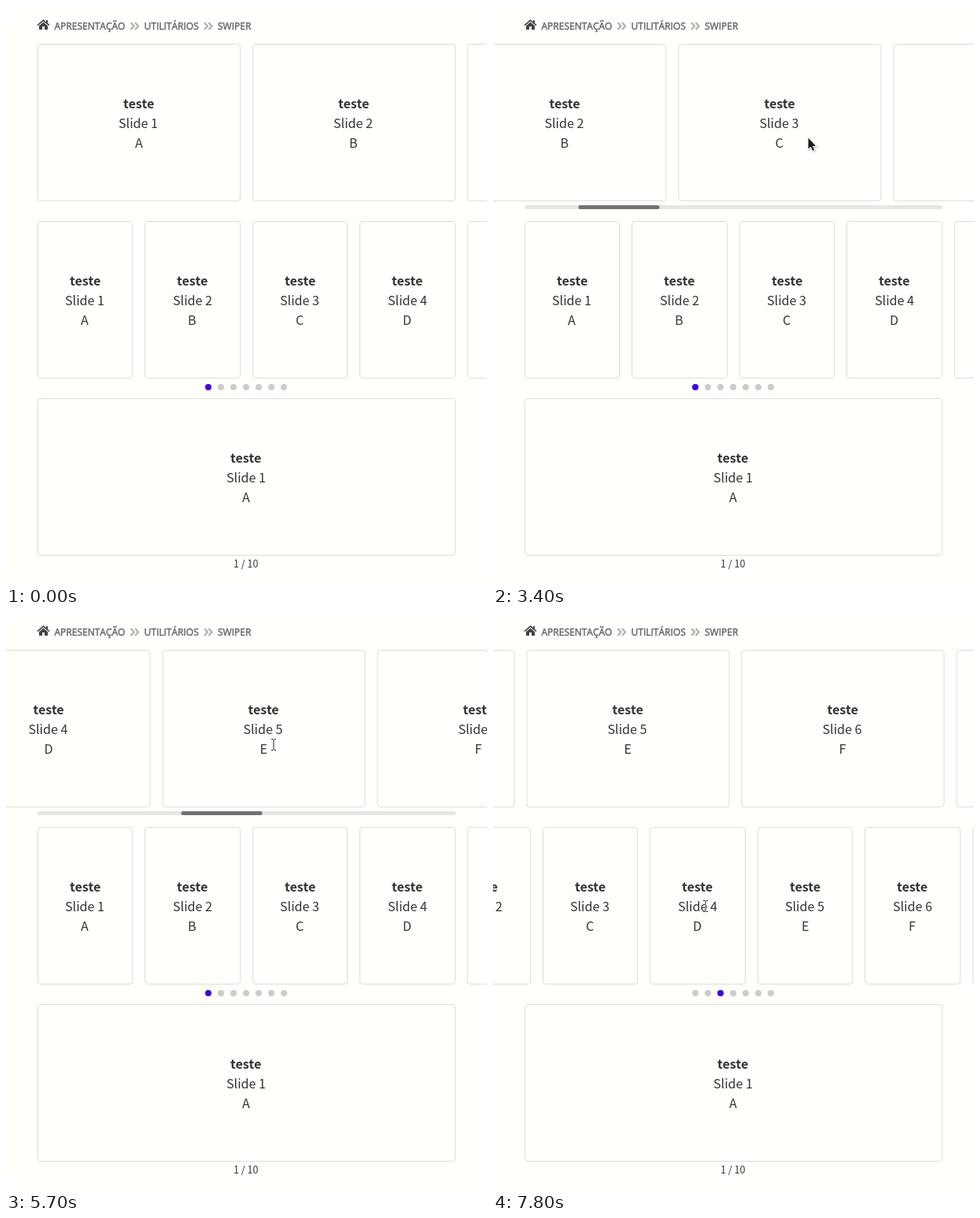
Write an HTML page with a canvas that moves like this. It is 611 px wide and 734 px high and loops after 8000 ms.

```html
<!DOCTYPE html>
<html lang="pt">
<head>
<meta charset="utf-8">
<title>Swiper</title>
<style>
  html, body { margin: 0; height: 100%; overflow: hidden; background: #fffffc; }
  canvas { display: block; }
</style>
</head>
<body>
<canvas width="611" height="734"></canvas>
<script>
const ctx = document.querySelector('canvas').getContext('2d');
const SANS = '"Noto Sans CJK JP", "Noto Sans CJK SC", "Noto Sans CJK", sans-serif';
const LOOP = 8000, LAST = 7800, STEP = 100, SWIPE = 550, FADE = 400;

const topSwipes = [
  { start: 1563, x: 414, y: 175, distance: 273 },
  { start: 3204, x: 478, y: 167, distance: 267 },
  { start: 4370, x: 524, y: 167, distance: 275 },
  { start: 5448, x: 459, y: 168, distance: 271, beam: true }
];
const midSwipe = { start: 7348, x: 520, y: 373, distance: 273, beam: true };
const swipes = [...topSwipes, midSwipe];

// The pointer enters, then glides from one swipe to the next.
const dragEnds = ({ start, x, y, distance }) => [[start, x, y], [start + SWIPE, x - distance, y]];
const waypoints = [
  [700, 16, 121], [900, 264, 180], [1100, 264, 180],
  ...topSwipes.flatMap(dragEnds), [6600, 422, 347], ...dragEnds(midSwipe)
];

function ease(t, start, duration) {
  const p = Math.min(1, Math.max(0, (t - start) / duration));
  return p * p * (3 - 2 * p);
}

const swiped = (t, swipe) => swipe.distance * ease(t, swipe.start, SWIPE);

function pointerAt(t) {
  const next = waypoints.findIndex(([time]) => time > t);
  const [t0, x0, y0] = waypoints[next - 1], [t1, x1, y1] = waypoints[next];
  const p = ease(t, t0, t1 - t0);
  return [x0 + (x1 - x0) * p, y0 + (y1 - y0) * p];
}

// Text starts on a whole pixel before any scroll offset is applied.
function centered(str, center, y, font, offset = 0) {
  ctx.font = font;
  ctx.fillStyle = '#333331';
  ctx.fillText(str, Math.floor(center - ctx.measureText(str).width / 2) - offset, y);
}

function roundBar(x, y, w, h, color) {
  ctx.fillStyle = color;
  ctx.beginPath();
  ctx.roundRect(x, y, w, h, h / 2);
  ctx.fill();
}

function breadcrumb() {
  ctx.fillStyle = '#444442';
  ctx.fill(new Path2D('M47.5 17 L51 20 V18 H53 V21.8 L55.5 24 L54.5 25.2 L47.5 19.2 L40.5 25.2 L39.5 24Z'));
  ctx.fill(new Path2D('M47.5 20.5 L53 25.2 V30 H49 V26 H46 V30 H42 V25.2Z'));
  ctx.font = '12px "Open Sans", sans-serif';
  ctx.fontKerning = 'none';
  ctx.fillStyle = ctx.strokeStyle = '#666664';
  ctx.lineWidth = 0.45;
  for (const [label, x] of [['APRESENTAÇÃO', 61.5], ['UTILITÁRIOS', 175.5], ['SWIPER', 269]]) {
    ctx.fillText(label, x, 30);
    ctx.strokeText(label, x, 30);
  }
  ctx.fontKerning = 'auto';
  ctx.strokeStyle = '#b0b0ad';
  ctx.lineWidth = 2.2;
  for (const x of [158.5, 164, 252, 257.5])
    ctx.stroke(new Path2D(`M${x} 21 l4 4.5 l-4 4.5`));
}

function slides(y, count, width, offset) {
  for (let i = 0; i < count; i++) {
    const start = 40 + i * (width + 15);
    const left = Math.floor(start), right = Math.floor(start + width);
    ctx.strokeStyle = '#dcdcd9';
    ctx.lineWidth = 1;
    ctx.beginPath();
    ctx.roundRect(left - offset + 0.5, y + 0.5, right - left - 1, 199, 3.5);
    ctx.stroke();
    const center = start + width / 2;
    centered('teste', center, y + 82, `bold 16.1px ${SANS}`, offset);
    centered(`Slide ${i + 1}`, center, y + 107, `16.1px ${SANS}`, offset);
    centered(String.fromCharCode(65 + i), center, y + 132, `16.1px ${SANS}`, offset);
  }
}

function scrollbar(offset, alpha) {
  const ratio = 531 / 2715;
  ctx.globalAlpha = alpha;
  roundBar(40, 253, 531, 5, 'rgba(0,0,0,.1)');
  roundBar(40 + offset * ratio, 253, Math.floor(531 * ratio), 5, 'rgba(0,0,0,.5)');
  ctx.globalAlpha = 1;
}

function bullets(active) {
  for (let i = 0; i < 7; i++)
    roundBar(253 + 16 * i, 480, 8, 8, i === active ? '#4300ea' : '#ccccca');
}

function cursor([x, y], beam) {
  const shape = new Path2D(beam
    ? 'M-3 -6.5 H-1 L0 -5.5 L1 -6.5 H3 M0 -5.5 V6.5 M-3 7.5 H-1 L0 6.5 L1 7.5 H3'
    : 'M.5 .5 V14.5 L3.7 11.5 L6 16.7 L8 15.8 L5.8 10.7 H10Z');
  ctx.save();
  ctx.translate(Math.round(x), Math.round(y));
  ctx.strokeStyle = '#fff';
  ctx.lineWidth = 2;
  if (!beam) {
    ctx.shadowColor = 'rgba(0,0,0,.3)';
    ctx.shadowBlur = 2;
    ctx.shadowOffsetX = ctx.shadowOffsetY = 1;
  }
  ctx.stroke(shape);
  ctx.shadowColor = 'transparent';
  ctx.fillStyle = ctx.strokeStyle = '#1a1a1a';
  ctx.lineWidth = 1;
  if (beam) ctx.stroke(shape);
  else ctx.fill(shape);
  ctx.restore();
}

function draw(now) {
  const t = Math.min(LAST, Math.floor((now % LOOP) / STEP) * STEP);
  const settle = 3.5 * ease(t, 6600, SWIPE);
  const top = topSwipes.reduce((sum, swipe) => sum + swiped(t, swipe), settle);
  const mid = swiped(t, midSwipe);
  ctx.fillStyle = '#fffffc';
  ctx.fillRect(0, 0, 611, 734);
  breadcrumb();
  slides(48, 10, 258, top);
  scrollbar(top, ease(t, 1500, FADE) - ease(t, 7100, FADE));
  slides(273, 10, 121.5, mid);
  bullets(Math.round(mid / 136.5));
  slides(498, 1, 531, 0);
  centered('1 / 10', 305.5, 713, `12.5px ${SANS}`);
  const beam = swipes.some(s => s.beam && t >= s.start && t < s.start + SWIPE);
  if (t >= waypoints[0][0]) cursor(pointerAt(t), beam);
  requestAnimationFrame(draw);
}
requestAnimationFrame(draw);
</script>
</body>
</html>
```
